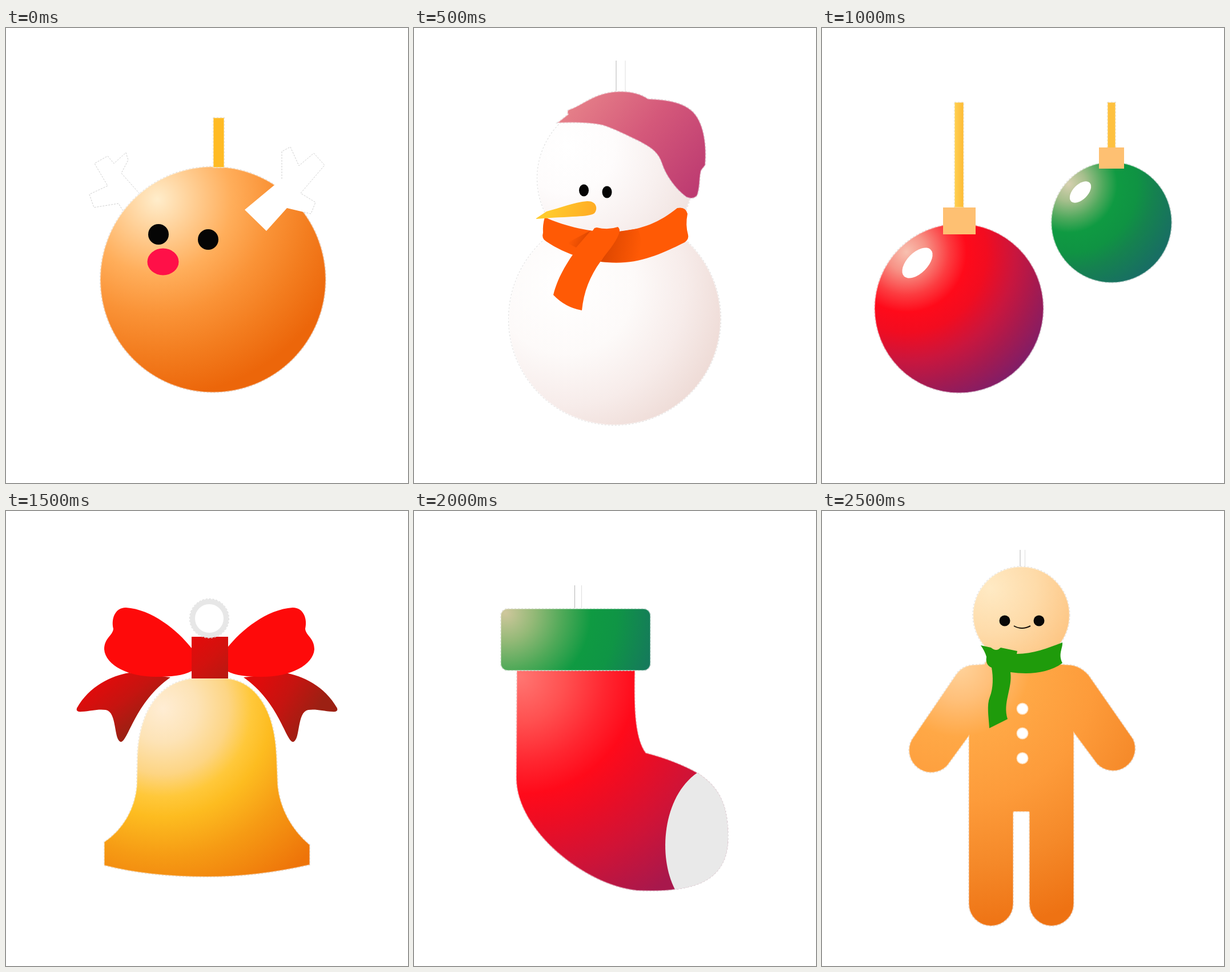
These frames come from a looping animation (704x796 px, 3000 ms). An HTML page with a canvas:

```html
<!DOCTYPE html>
<html lang="en">
<head>
<meta charset="utf-8">
<title>Christmas ornaments</title>
<style>
html, body { margin: 0; width: 100%; height: 100%; overflow: hidden; background: #fff; }
canvas { display: block; }
</style>
</head>
<body>
<canvas id="stage" width="704" height="796"></canvas>
<script>
const ctx = document.getElementById('stage').getContext('2d');
const HOLD = 500;

// Stops are [distance, colour], distance in pixels from the centre.
function glow(x, y, ...stops) {
  const reach = stops[stops.length - 1][0];
  const paint = ctx.createRadialGradient(x, y, 0, x, y, reach);
  for (const [at, color] of stops) paint.addColorStop(at / reach, color);
  return paint;
}

function slope(x1, y1, x2, y2, ...colors) {
  const paint = ctx.createLinearGradient(x1, y1, x2, y2);
  colors.forEach((c, i) => paint.addColorStop(i / (colors.length - 1), c));
  return paint;
}

function fill(shape, paint) {
  ctx.fillStyle = paint;
  ctx.fill(typeof shape === 'string' ? new Path2D(shape) : shape);
}

function line(shape, color, width = 1, dash = []) {
  ctx.strokeStyle = color;
  ctx.lineWidth = width;
  ctx.setLineDash(dash);
  ctx.stroke(typeof shape === 'string' ? new Path2D(shape) : shape);
}

function oval(x, y, rx, ry = rx, turn = 0) {
  const p = new Path2D();
  p.ellipse(x, y, rx, ry, turn, 0, Math.PI * 2);
  return p;
}

function box(left, top, right, bottom, radius = 0) {
  const p = new Path2D();
  p.roundRect(left, top, right - left, bottom - top, radius);
  return p;
}

// Fill with a pale rim inside and a faint broken contour outside.
function piece(shape, paint) {
  const p = typeof shape === 'string' ? new Path2D(shape) : shape;
  line(p, '#d2d2d2', 2, [3, 3]);
  fill(p, paint);
  line(p, 'rgba(255,255,255,.4)', 2);
}

function whiteString(x1, x2, top, bottom) {
  line(`M${x1} ${top}V${bottom}`, '#b4b4b4');
  line(`M${x2} ${top}V${bottom}`, '#dedede');
}

// The second paint is given in flipped coordinates.
function mirrored(width, shape, paint, flippedPaint = paint) {
  fill(shape, paint);
  ctx.save();
  ctx.translate(width, 0);
  ctx.scale(-1, 1);
  fill(shape, flippedPaint);
  ctx.restore();
}

function reindeer() {
  line('M234 290L202 254L214 231L210 218L189 237L178 224L155 237L178 276L146 291L154 314L197 307L205 320', '#cfcfcf', 1, [3, 2]);
  piece(oval(362.5, 440, 197.5), glow(265, 300, [0, '#ffedcb'], [60, '#ffd097'],
    [130, '#ffae5b'], [200, '#fa9337'], [270, '#f37d1f'], [345, '#ec660a']));
  piece(box(363, 157, 382, 244), '#ffbb24');
  const antler = new Path2D('M418 318L483 264V216L498 208L513 241L539 219L558 240L516 289L542 305L534 325L492 315L456 355Z');
  fill(antler, '#fff');
  line('M483 264V216L498 208L513 241L539 219L558 240L516 289L542 305L534 325L521 322', '#cfcfcf', 1, [3, 2]);
  fill(oval(267, 361, 18), '#050505');
  fill(oval(354, 370, 18), '#050505');
  fill(oval(275, 409, 27.5, 23.5), '#ff1048');
}

function snowman() {
  whiteString(354, 370, 57, 110);
  piece(oval(351.5, 509, 185.5), glow(265, 450, [0, '#fff'], [120, '#fdfaf9'],
    [210, '#f7ecea'], [320, '#ebd5cf']));
  piece(oval(352, 263, 136), glow(270, 210, [0, '#fff'], [80, '#fefcfc'], [160, '#f8f0ef'], [250, '#efe1de']));
  piece('M251 166L270 151Q267 146 271 143C295 136 315 112 360 111C385 111 400 117 410 124C440 125 470 129 488 146C508 166 513 205 510 240L503 249C499 262 502 275 496 293Q489 301 477 296C457 281 441 258 434 237C427 215 412 208 394 198C375 189 350 176 330 170C305 165 280 165 251 166Z',
    slope(280, 120, 490, 290, '#e68189', '#d4587a', '#bd3b71'));
  fill('M229 331Q225 345 226 358Q223 368 231 373C270 400 325 414 370 410C410 407 450 387 474 375Q482 369 480 362Q475 345 479 325Q476 312 461 315C430 340 400 352 360 356C310 360 260 345 229 331Z', '#ff5a05');
  fill('M359 356L327 409Q372 412 408 402L392 351Z', slope(332, 380, 396, 392, '#dc4600', '#ff5a05'));
  fill('M310 354L284 384L268 376Z', slope(302, 374, 276, 362, '#dc4600', '#ff5a05'));
  fill('M320 349Q340 354 357 348Q362 352 359 360C352 378 339 391 327 408C308 434 297 462 294 494Q265 489 244 467C251 439 265 413 290 380C301 369 309 361 316 350Z', '#ff5a05');
  fill('M214 333L232 321C255 315 280 305 303 303C319 302 323 316 316 324C307 331 275 329 214 334Z',
    slope(240, 310, 310, 330, '#ffca2c', '#ffad24'));
  fill(oval(297.5, 284, 8.5, 10.5), '#050505');
  fill(oval(338, 287, 8.5, 10.5), '#050505');
}

function baubles() {
  piece(box(232, 130, 248, 314), slope(232, 0, 248, 0, '#ffd052', '#fdba35'));
  piece(oval(240, 490.5, 148), glow(148, 392, [0, '#f8c0b0'], [35, '#f79286'],
    [75, '#fc3c40'], [105, '#ff0a1a'], [140, '#f20c20'], [190, '#c9163e'], [235, '#a41a50'], [280, '#821d66']));
  fill(box(212, 314, 269, 361), '#fec072');
  fill(oval(167, 411, 33, 18, -Math.PI / 4), '#fff');

  piece(box(500, 130, 514, 210), '#fec13f');
  piece(oval(507, 340, 105.5), glow(432, 273, [0, '#d6d0b0'], [30, '#a5bf8c'],
    [60, '#4fa95d'], [85, '#0f9a42'], [120, '#0f9343'], [150, '#15824f'], [200, '#186e63']));
  fill(box(485, 209, 529, 246), '#fec072');
  fill(oval(452.5, 287, 23, 13, -Math.PI / 4), '#fff');
}

function bell() {
  const ribbon = ['#e00b0b', '#c51410', '#9c2013'];
  mirrored(704, 'M216 283C185 288 146 306 124 345Q122 352 132 351C150 350 160 346 175 348C195 352 188 400 201 404C214 404 225 335 288 291Z',
    slope(165, 300, 225, 380, ...ribbon), slope(260, 290, 160, 350, ...ribbon));
  mirrored(712, 'M325 240C300 208 255 172 210 169C190 169 184 190 188 206C187 218 172 222 172 242C174 270 215 290 262 290C290 290 310 288 325 280Z',
    '#fe0a0a');
  piece('M326 293H388C436 299 471 345 474 430L476 480C480 520 500 557 532 584V619Q440 640 352 640Q250 640 172 620V579C205 557 226 520 229 480L230 430C233 345 272 299 326 293Z',
    glow(275, 345, [0, '#ffedd4'], [60, '#fde3b6'], [115, '#fdd584'], [155, '#ffc83a'],
      [190, '#fdbc20'], [260, '#f69b14'], [360, '#ee7409']));
  fill(box(325, 220, 389, 293), slope(330, 225, 385, 290, '#e20b0b', '#d2120e', '#b91811'));
  line(oval(356, 188, 29.5), '#e7e7e7', 9);
  line(oval(356, 188, 34.5), '#d8d8d8', 1, [3, 3]);
}

function stocking() {
  whiteString(281.5, 293.5, 130, 170);
  piece('M180 275H387C386 330 385 395 406 423C440 432 472 444 496 458C535 483 550 515 550 570C550 630 515 655 457 662C440 665 410 665 390 664C300 655 180 560 179 468Z',
    glow(185, 290, [0, '#ff7672'], [80, '#ff5050'], [150, '#ff2630'], [205, '#ff0a1a'],
      [260, '#ec0d24'], [340, '#d01336'], [440, '#a8184c']));
  fill('M496 458C435 500 427 605 457 662C515 655 550 630 550 570C550 515 535 483 496 458Z', '#e9e9e9');
  piece(box(152, 171, 414, 279, 12), glow(160, 178, [0, '#cfc79c'], [50, '#94b977'],
    [100, '#4fa958'], [150, '#0f9a42'], [195, '#0f9545'], [265, '#157a5b']));
}

function gingerbread() {
  whiteString(347, 355.5, 68, 97);
  piece('M284 268L268 269Q246 269 234 287L157 400A39 39 0 0 0 219 446L257 394V687A39 39 0 0 0 335 687V528Q335 526 337 526H361Q363 526 363 528V687A39 39 0 0 0 441 687V388L482 443A39 39 0 0 0 545 399L467 287Q451 269 430 269L418 268L400 240H300Z',
    glow(240, 270, [0, '#ffd39c'], [60, '#ffc07a'], [125, '#ffa846'], [240, '#fd9b3a'],
      [350, '#f58929'], [465, '#ee7213']));
  piece(oval(349, 182, 84.5), glow(295, 135, [0, '#ffeac4'], [80, '#fedba9'], [165, '#fdc37f']));
  fill('M278 235L296 239Q303 245 309 242L313 239L342 245L341 250C370 250 395 240 421 230C422 240 413 250 421 266C395 285 360 286 330 282C334 310 316 335 325 364L293 380C292 360 288 340 294 325C300 310 300 290 297 274Q286 270 288 255Q285 245 278 235Z', '#1f9b0b');
  fill(oval(320, 192, 9.5), '#080808');
  fill(oval(380, 192, 9.5), '#080808');
  line('M336 201Q350 209 365 201', '#15100a', 2);
  for (const y of [346, 389, 432.5]) {
    fill(oval(351, y, 10.5), '#ffdfbd');
    fill(oval(351, y, 9), '#fff');
  }
}

const scenes = [reindeer, snowman, baubles, bell, stocking, gingerbread];
const start = performance.now();
let shown = -1;

function tick() {
  const index = Math.floor((performance.now() - start) / HOLD) % scenes.length;
  if (index !== shown) {
    shown = index;
    ctx.fillStyle = '#fff';
    ctx.fillRect(0, 0, 704, 796);
    scenes[index]();
  }
  requestAnimationFrame(tick);
}
tick();
</script>
</body>
</html>
```
